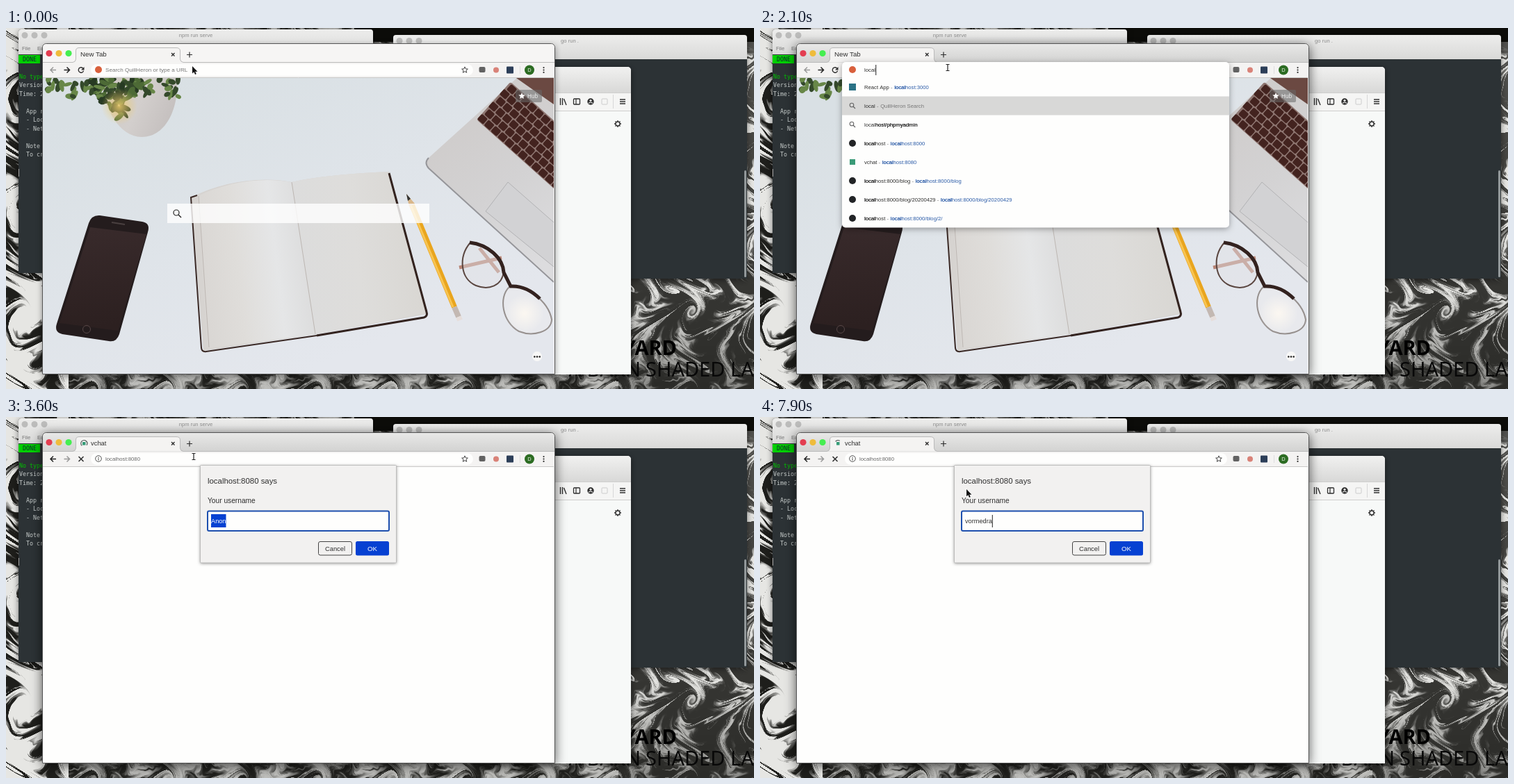
An HTML page with a canvas that plays this animation: 1076x520 px, repeating every 8000 ms.

```html
<!DOCTYPE html>
<html lang="en">
<head>
<meta charset="utf-8">
<title>Opening vchat</title>
<style>
html, body { margin: 0; width: 100%; height: 100%; overflow: hidden; background: #222; }
canvas { display: block; }
</style>
</head>
<body>
<canvas id="stage" width="1076" height="520"></canvas>
<script>
const W = 1076, H = 520, LOOP = 8000, TAU = Math.PI * 2;
const SANS = '"Liberation Sans", sans-serif';
const MONO = '"DejaVu Sans Mono", monospace';
const NOTO = '"Noto Sans", sans-serif';
const BLUE = '#0641d2', INK = '#2e2e2e', GREY = '#777';
const stage = document.getElementById('stage').getContext('2d');
let g = stage;

// ---- drawing helpers ----
function rect(x, y, w, h, fill, r = 0, stroke, lineWidth = 1) {
  g.beginPath();
  g.roundRect(x, y, w, h, r);
  if (fill) { g.fillStyle = fill; g.fill(); }
  if (stroke) { g.strokeStyle = stroke; g.lineWidth = lineWidth; g.stroke(); }
}
function disc(x, y, r, fill) {
  g.beginPath();
  g.arc(x, y, r, 0, TAU);
  g.fillStyle = fill;
  g.fill();
}
function arc(x, y, r, color, width = 1, from = 0, to = TAU) {
  g.beginPath();
  g.arc(x, y, r, from, to);
  g.strokeStyle = color;
  g.lineWidth = width;
  g.stroke();
}
function shape(path, fill) {
  g.fillStyle = fill;
  g.fill(new Path2D(path));
}
function line(path, color, width = 1) {
  g.strokeStyle = color;
  g.lineWidth = width;
  g.stroke(new Path2D(path));
}
function text(str, x, y, size, color = INK, font = SANS, align = 'left', weight = 400) {
  g.font = `${weight} ${size}px ${font}`;
  g.textAlign = align;
  g.fillStyle = color;
  g.fillText(str, x, y + size * 0.35);
  return g.measureText(str).width;
}
// Asterisks toggle a slightly heavier stroke; returns the end x.
function rich(str, x, y, size, color) {
  str.split('*').forEach((part, i) => {
    const w = text(part, x, y, size, color);
    if (i % 2) text(part, x + 0.2, y, size, color);
    x += w;
  });
  return x;
}
function gradient(x0, y0, x1, y1, ...colors) {
  const fill = g.createLinearGradient(x0, y0, x1, y1);
  colors.forEach((c, i) => fill.addColorStop(i / (colors.length - 1), c));
  return fill;
}
function glow(x, y, r, color) {
  const fill = g.createRadialGradient(x, y, 0, x, y, r);
  fill.addColorStop(0, `rgba(${color},.85)`);
  fill.addColorStop(1, `rgba(${color},0)`);
  disc(x, y, r, fill);
}
function shadowed(color, blur, offset, draw) {
  g.save();
  g.shadowColor = color;
  g.shadowBlur = blur;
  g.shadowOffsetY = offset;
  draw();
  g.restore();
}
function layer(draw) {
  const canvas = document.createElement('canvas');
  canvas.width = W;
  canvas.height = H;
  g = canvas.getContext('2d');
  draw();
  g = stage;
  return canvas;
}
function seeded(seed) {
  return () => (seed = (seed * 16807) % 2147483647) / 2147483647;
}

// ---- desktop behind the browser ----
function marble() {
  const img = g.createImageData(W, H);
  for (let y = 0, p = 0; y < H; y++) for (let x = 0; x < W; x++, p += 4) {
    const scale = x < 90 ? 34 : 24;
    let u = x / scale, v = y / scale;
    for (let i = 1; i < 9; i++) {
      u += 0.9 / i * Math.sin(i * 1.3 * v + i * 2.1);
      v += 0.9 / i * Math.cos(i * 1.4 * u + i);
    }
    const n = 0.5 + 0.5 * Math.sin(u * 2.3 + v * 1.7);
    const veins = n ** 4 * 0.75 + 0.1;
    const light = x < 90 ? (n - 0.12) * 2.6 : x > 880 ? veins * (1.25 - (y - 360) / 260) : n * 0.8;
    const c = y < 20 && x > 500 ? 12 : 30 + 200 * Math.min(1, Math.max(0, light));
    img.data.set([c, c, c - 3, 255], p);
  }
  g.putImageData(img, 0, 0);
}
function terminal(x, y, w, h, bar, title, titleX) {
  shadowed('rgba(0,0,0,.5)', 8, 2, () => rect(x, y, w, h, '#2c3235', [4, 4, 0, 0]));
  rect(x, y, w, bar, gradient(0, y, 0, y + bar, '#ededec', '#d9d9d8'), [4, 4, 0, 0]);
  for (let i = 0; i < 3; i++) disc(x + 9 + 14 * i, y + 8.5, 4.5, '#bcbcbb');
  text(title, titleX, y + 8, 7.6, '#8a8a8a', SANS, 'center');
}
const desktop = layer(() => {
  marble();
  text('YARD', 965, 461, 29, '#000', NOTO, 'right', 700);
  text('A BARN', 913, 491.5, 29, '#080808', NOTO, 'right');
  text('SHADED LAWN', 920, 491.5, 29, '#080808', NOTO);

  terminal(18, 2, 510, 351, 36, 'npm run serve', 273);
  text('File', 23, 29, 7.6, '#777');
  text('Edit', 45, 29, 7.6, '#777');
  rect(18, 39, 31, 12, '#00d000');
  const log = (str, y, x = 19, color = '#c6cbca') => text(str, x, y, 8.3, color, MONO);
  log('DONE', 45, 24, '#123');
  log('No type errors', 70, 19, '#00c200');
  log('Version', 82);
  log('Time: 2', 95);
  ['App running', '- Local', '- Network', '', 'Note that', 'To create'].forEach((s, i) => log(s, 120 + 12.5 * i, 29));
  rect(18, 203, 1, 11, '#aaa');

  terminal(557, 10, 509, 351, 35, 'go run .', 811);
  rect(1062, 205, 3, 154, '#92989a', 1.5);

  shadowed('rgba(0,0,0,.5)', 10, 2, () => rect(700, 56, 199, 443, '#f7f9f8', [0, 5, 0, 0]));
  rect(700, 56, 199, 37, gradient(0, 56, 0, 93, '#f1f1f0', '#d8d8d7'), [0, 5, 0, 0]);
  rect(700, 93, 199, 26, '#f5f5f4');
  line('M700 93.5H899M700 119.5H899', '#cfcfce');
  line('M797.5 101V111M800.5 101V111M802.5 102L806 111', INK, 1.4);
  rect(816.5, 102, 9, 8, null, 1, INK, 1.3);
  line('M820 102V110', INK, 1.2);
  disc(841, 106, 4.7, INK);
  disc(841, 104.5, 1.6, '#f5f5f4');
  line('M838 108.5Q841 106 844 108.5', '#f5f5f4', 1.2);
  rect(857, 102, 8, 8, null, 1, '#ccc');
  line('M873.5 96V116', '#d8d8d8');
  line('M883 103H891M883 106H891M883 109H891', INK, 1.3);
  for (let i = 0; i < 8; i++) {
    const a = i * TAU / 8, c = Math.cos(a), s = Math.sin(a);
    line(`M${880 + 3 * c} ${138 + 3 * s}L${880 + 5 * c} ${138 + 5 * s}`, INK, 1.3);
  }
  arc(880, 138, 3, INK, 1.3);
});

// ---- new tab page ----
const photo = layer(() => {
  g.beginPath(); g.rect(53, 72, 735, 426); g.clip();
  rect(53, 72, 735, 426, gradient(250, 72, 420, 498, '#d9e0e4', '#dfe4e9', '#e4e7ed'));

  // plant
  shape('M136 72H246C249 112 232 157 195 157C162 156 142 118 136 72Z', gradient(140, 80, 245, 130, '#cfc8c2', '#d3cfcd', '#c3bebd'));
  const random = seeded(12), greens = ['#34492b', '#4d6a36', '#688748', '#273a23'];
  for (let i = 0; i < 130; i++) {
    const middle = i % 2, reach = random();
    const x = middle ? 125 + 70 * reach : 60 + 188 * reach;
    const y = 73 + random() * (middle ? 48 * Math.sin(Math.PI * reach) + 8 : 26);
    g.fillStyle = greens[i % 4];
    g.beginPath();
    g.ellipse(x, y, 4 + 5 * random(), 2.5 + 2 * random(), random() * TAU, 0, TAU);
    g.fill();
  }
  glow(163, 113, 26, '240,205,110');

  // laptop
  shape('M735 72L608 187Q601 194 608 202L788 366V72Z', gradient(640, 130, 788, 330, '#cfcccb', '#d3d2d3', '#dcdcde'));
  line('M608 187Q601 194 608 202L788 366', '#96969a', 2);
  shape('M734 72H788V110Z', '#6b4942');
  g.save();
  g.translate(677, 132);
  g.rotate(0.73);
  rect(0, -73, 170, 73, '#8e7671', 3);
  for (let row = 0; row < 6; row++) for (let key = 0; key < 13; key++)
    rect(key * 13 + row % 2 * 3, -11.5 - row * 12, 11.5, 10.5, '#43231f', 2);
  g.restore();
  shape('M722 222L788 280V344L690 264Z', '#d2d2d4');
  line('M788 280L722 222L690 264L788 344', '#b2b2b4');

  // notebook
  shape('M266 244C310 222 365 213 411 222C455 212 510 209 551 207L605 412L446 441L284 465Z', '#d6d3d0');
  shape('M276 242C315 223 365 214 411 222L445 441L290 462Z', gradient(270, 300, 440, 280, '#d9d6d3', '#dfddda', '#e5e6e7', '#dadada'));
  shape('M411 222C455 212 510 209 550 207L603 411L445 441Z', gradient(415, 320, 590, 300, '#dcdcdc', '#dedddb', '#d9d7d3'));
  line('M277 242L292 460M411 222L445 441', '#bdb7b3');
  line('M275 241L266 244L281 461Q282 467 288 466L447 443', '#3a2925', 2);
  line('M447 443L601 417Q607 415 605 409L551 209', '#33231f', 3);

  // pencil
  line('M584 255L645 402', '#e9a51e', 8);
  line('M582 255L643 402', '#f8c451', 3);
  shape('M576 239L588 253L580 257Z', '#d9b78a');
  shape('M576 239L582 246L578 249Z', '#333');
  line('M645 402L651 416', '#c3b8b2', 8);
  line('M651 416L653 421', '#e6dedb', 8);

  // phone
  shape('M135 270L196 279Q208 281 204 294L163 441Q159 453 148 451L81 441Q69 438 73 426L119 281Q123 269 135 270Z', '#241c1d');
  shape('M121 287L202 297L161 436L77 425Z', gradient(120, 290, 130, 430, '#382a2b', '#2c2020'));
  arc(116, 434, 5.5, '#564747');
  line('M152 280L171 283', '#4a4040', 2);

  // glasses
  const lens1 = 'M668 309C690 310 716 328 716 350C714 372 694 378 676 371C654 362 650 330 668 309Z';
  const lens2 = 'M724 373C745 368 780 392 785 420C784 438 758 445 738 437C714 424 708 388 724 373Z';
  line('M652 345L713 331M681 317L709 352', '#b78475', 5);
  shape(lens1, 'rgba(225,225,228,.45)');
  shape(lens2, 'rgba(235,235,238,.6)');
  line(lens1, '#5a4640', 2);
  line(lens2, '#96908e', 2);
  line('M667 309C694 312 715 332 716 352L726 372C745 371 758 380 768 390', '#33221f', 5);
  glow(746, 411, 28, '255,250,242');

  rect(232, 253, 377, 28, 'rgba(255,255,255,.8)');
  arc(245, 266, 4, '#222', 1.2);
  line('M248 269L252 273', '#222', 1.4);
  rect(733, 89, 38, 18, 'rgba(105,105,105,.55)', 2);
  star(742, 98, 5, '#fff');
  text('Hub', 750, 98, 8.2, '#eee');
  disc(764, 473, 7, '#f8f8f7');
  for (let i = -1; i < 2; i++) disc(764 + 3.7 * i, 473.5, 1.3, '#222');
});

// ---- browser icons ----
function star(x, y, r, fill, stroke) {
  g.beginPath();
  for (let i = 0; i < 10; i++) {
    const a = i * TAU / 10 - TAU / 4, d = i % 2 ? r * 0.45 : r;
    g.lineTo(x + d * Math.cos(a), y + d * Math.sin(a));
  }
  g.closePath();
  if (fill) { g.fillStyle = fill; g.fill(); }
  if (stroke) { g.strokeStyle = stroke; g.lineWidth = 1; g.stroke(); }
}
const icons = {
  engine: y => disc(133, y, 5, '#d9603c'),
  react: y => rect(128, y - 5, 10, 10, '#2b7286'),
  vue: y => rect(129, y - 4, 8, 8, '#3a9b77'),
  site: y => disc(133, y, 5, '#222426'),
  square: y => rect(128, y - 5, 10, 10, '#3f7fc0'),
  info(y) {
    arc(133, y, 4.3, '#555');
    line(`M133 ${y - 2.3}v1.2M133 ${y - .5}v3`, '#555', 1.1);
  },
  search(y) {
    arc(132, y - 1, 2.8, '#666', 1.1);
    line(`M134 ${y + 1}L137 ${y + 4}`, '#666', 1.2);
  },
  clock(y) {
    arc(133, y, 4.3, '#666');
    line(`M133 ${y - 2.5}v2.5l2 1.3`, '#666');
  }
};

// ---- suggestions: icon, title, tail, tail is plain text ----
const earlyRows = [
  ['react', 'React App', '*l*ocalhost:3000'],
  ['search', 'l', 'QuillHeron Search', true],
  ['clock', 'layout is not picking up site metadata'],
  ['site', '*l*ocalhost', '*l*ocalhost:8000'],
  ['vue', 'vchat', '*l*ocalhost:8080'],
  ['square', 'Marovin Teldra | LoomPost', 'loompost.example/in/teldramarovin-57b20814a'],
  ['site', 'Lantern Archive', 'lan.arc.example'],
  ['site', 'teldra/JSBundleSize: Plover action for computing javascript bundle size. It calculates & logs Jav...', 'plover.example/teldra/JSBundleSize']
];
const rows = [
  ['react', 'React App', '*local*host:3000'],
  ['search', 'local', 'QuillHeron Search', true],
  ['search', 'local*host/phpmyadmin*'],
  ['site', '*local*host', '*local*host:8000'],
  ['vue', 'vchat', '*local*host:8080'],
  ['site', '*local*host:8000/blog', '*local*host:8000/blog'],
  ['site', '*local*host:8000/blog/20200429', '*local*host:8000/blog/20200429'],
  ['site', '*local*host', '*local*host:8000/blog/2/']
];
// start, typed, selected completion, highlighted row, icon
const typing = [
  [1000, 'l', 'ocalhost:3000', 0, 'react'],
  [1200, 'lo', 'calhost:3000', 0, 'react'],
  [1300, 'loc', 'alhost:3000', 0, 'react'],
  [1500, 'loca', 'lhost:3000', 0, 'react'],
  [1600, 'local', 'host:3000', 0, 'react'],
  [2100, 'local', '', 1, 'engine'],
  [2300, 'localhost/phpmyadmin', '', 2, 'search'],
  [2400, 'localhost:8000', '', 3, 'site'],
  [2600, 'localhost:8080', '', 4, 'vue']
];
const userName = 'vormedra';
const keyTimes = [5300, 6000, 6500, 6700, 6900, 7100, 7500, 7700];

function suggestions(t, active) {
  g.save();
  g.globalAlpha = t < 1200 ? 0.13 : t < 3000 ? 1 : 0.4;
  shadowed('rgba(0,0,0,.35)', 8, 2, () => rect(118, 49, 557, 238.5, '#fefefd', 5));
  rect(118, 71.5 + 27 * active, 557, 27, '#d8d8d7');
  (t < 1500 ? earlyRows : rows).forEach(([icon, title, tail, plain], i) => {
    const y = 85 + 27 * i;
    icons[icon](y);
    let x = rich(title, 150, y, 7.7, INK);
    if (!tail) return;
    x = rich(' - ', x, y, 7.7, GREY) + 0.5;
    rich(tail, x, y, 7.7, plain ? GREY : '#2c5ca8');
  });
  g.restore();
}

function omnibox(t) {
  const step = typing.filter(s => s[0] <= t).pop();
  rect(122, 52, 550, 17, '#fefefd', 8.5);
  if (step && t < 3100) suggestions(t, step[3]);
  if (!step) {
    icons.engine(60);
    text('Search QuillHeron or type a URL', 143, 60, 8.1, GREY);
  } else if (t < 2900) {
    const [, typed, rest, , icon] = step;
    icons[icon](60);
    const x = 150 + text(typed, 150, 60, 7.75);
    if (rest) {
      g.font = `7.75px ${SANS}`;
      rect(x, 53, g.measureText(rest).width + 0.5, 15, BLUE);
      text(rest, x, 60, 7.75, '#fff');
    } else rect(x + 0.3, 53, 1, 15, '#222');
  } else {
    icons.info(60);
    text('localhost:8080', 143, 60, 7.75, t === 3000 ? INK : '#666');
  }
  if (!step || t >= 2900) star(660, 60.5, 4.6, null, '#444');
}

function spinner(t) {
  const k = (t / 1333 + 0.9) % 1;
  const sweep = 0.25 + 4.8 * Math.sin(Math.PI * k) ** 2;
  const head = t / 1568 * TAU + (k > 0.5 ? 4.8 * Math.cos(Math.PI * k) ** 2 : 0);
  arc(112.3, 38, 4.5, '#4d5755', 1.2, head, head + sweep);
}

function browser(t) {
  const focused = t >= 500, loading = t >= 2900, loaded = t >= 3000;
  shadowed(`rgba(0,0,0,${focused ? 0.65 : 0.4})`, focused ? 16 : 9, 3, () => rect(52, 22, 738, 477, '#f4f3f2', [5, 5, 0, 0]));
  rect(52, 22, 738, 28, focused ? gradient(0, 22, 0, 50, '#e9e9e8', '#d2d2d1') : '#f6f5f4', [5, 5, 0, 0]);
  ['#e33d50', '#efbc3b', '#45ee50'].forEach((c, i) => disc(62 + 14 * i, 36.5, 4.6, c));

  const tab = 'M96 49.5Q100 49 100.5 45V33Q100.5 28.5 105 28.5H245Q250.5 28.5 250.5 33V45Q251 49 255 49.5';
  rect(53, 50, 736, 22, '#f4f3f2');
  shape(tab, '#f4f3f2');
  line(`M52 49.5H96${tab}H789`, '#bababa');
  if (t < 3000) text('New Tab', loading ? 109 : 107, 38, 9.7);
  else if (t < 3200) text('localhost:8080', 120, 38, 9.1);
  else {
    text('vchat', 122, 38, 9.4);
    rect(110, 36, 4.5, 4.5, '#359c78');
  }
  if (loaded) spinner(t);
  line('M238 36L242.5 40.5M242.5 36L238 40.5', INK, 1.4);
  line('M260 38.5H268M264 34.5V42.5', INK, 1.2);

  const back = loaded ? '#222' : '#999', forward = loaded ? '#999' : '#222';
  line('M72 60.5H64M68 56.5L64 60.5L68 64.5', back, 1.5);
  line('M83.5 60.5H91.5M87.5 56.5L91.5 60.5L87.5 64.5', forward, 1.5);
  if (loading) line('M104.5 57L111.5 64M111.5 57L104.5 64', INK, 1.5);
  else {
    arc(108, 60.5, 3.7, INK, 1.4, 0.3, 5.5);
    shape('M112.5 56V60.5H108Z', INK);
  }

  if (loaded) rect(53, 72, 735, 426, '#fefefd');
  else g.drawImage(photo, 0, 0);
  line('M53 71.5H788', '#c9c9c8');
  omnibox(t);

  rect(680.5, 56, 9, 8, '#626262', 2);
  disc(705, 60.5, 4, '#d98278');
  rect(720, 55.5, 10, 10, '#2c3e58', 1);
  line('M739.5 55V66', '#ddd');
  disc(753, 60.5, 7, '#2c6c22');
  text('D', 753, 60.5, 7.5, '#e8f0e6', SANS, 'center');
  for (let i = -1; i < 2; i++) disc(773.5, 60.5 + 3.4 * i, 1.1, INK);
  rect(52.5, 22.5, 737, 476, null, [5, 5, 0, 0], '#555');
}

function dialog(t) {
  shadowed('rgba(0,0,0,.45)', 4, 1, () => rect(279.5, 69.5, 282, 140.5, '#f2f1f0', 1));
  rect(279.5, 69.5, 282, 140.5, null, 1, '#bdbdbc');
  text('localhost:8080 says', 290, 92, 11.4);
  text('Your username', 290, 120, 10.2);
  rect(290, 135.5, 261, 28.5, '#fefefd', 2, '#1d4fae', 2);
  const count = keyTimes.filter(k => k <= t).length;
  if (count) {
    const w = text(userName.slice(0, count), 295, 150, 9.2);
    rect(295 + w, 141, 1, 18, '#222');
  } else {
    rect(295, 140, 21.5, 19, BLUE);
    text('Anon', 295, 150, 9.2, '#fff');
  }
  rect(449.5, 179.5, 48, 19.5, null, 2.5, '#444');
  text('Cancel', 473.5, 189.5, 9.3, INK, SANS, 'center');
  rect(503, 179, 48, 20.5, BLUE, 2.5);
  text('OK', 527, 189.5, 9.6, '#fff', SANS, 'center');
}

function cursor(t) {
  if (t >= 100 && t < 3800) {
    const beam = 'M267.5 52.5H272.5M270 52.5V61.5M267.5 61.5H272.5';
    line(beam, '#fff', 2.4);
    line(beam, '#222', 1.2);
    return;
  }
  const k = Math.min(1, Math.max(0, (t - 3700) / 700)), ease = k * k * (3 - 2 * k);
  g.save();
  g.translate(268 + 29 * ease, 55 + 49 * ease);
  const arrow = 'M0 0V10.5L2.4 8.3L4 12L5.8 11.2L4.2 7.7H7.5Z';
  line(arrow, '#fff', 1.4);
  shape(arrow, '#111');
  g.restore();
}

function frame(now) {
  const t = Math.floor(now % LOOP / 100) * 100;
  g.drawImage(desktop, 0, 0);
  browser(t);
  if (t >= 3300) dialog(t);
  cursor(t);
  requestAnimationFrame(() => frame(performance.now() - start));
}
const start = performance.now();
frame(0);
</script>
</body>
</html>
```
